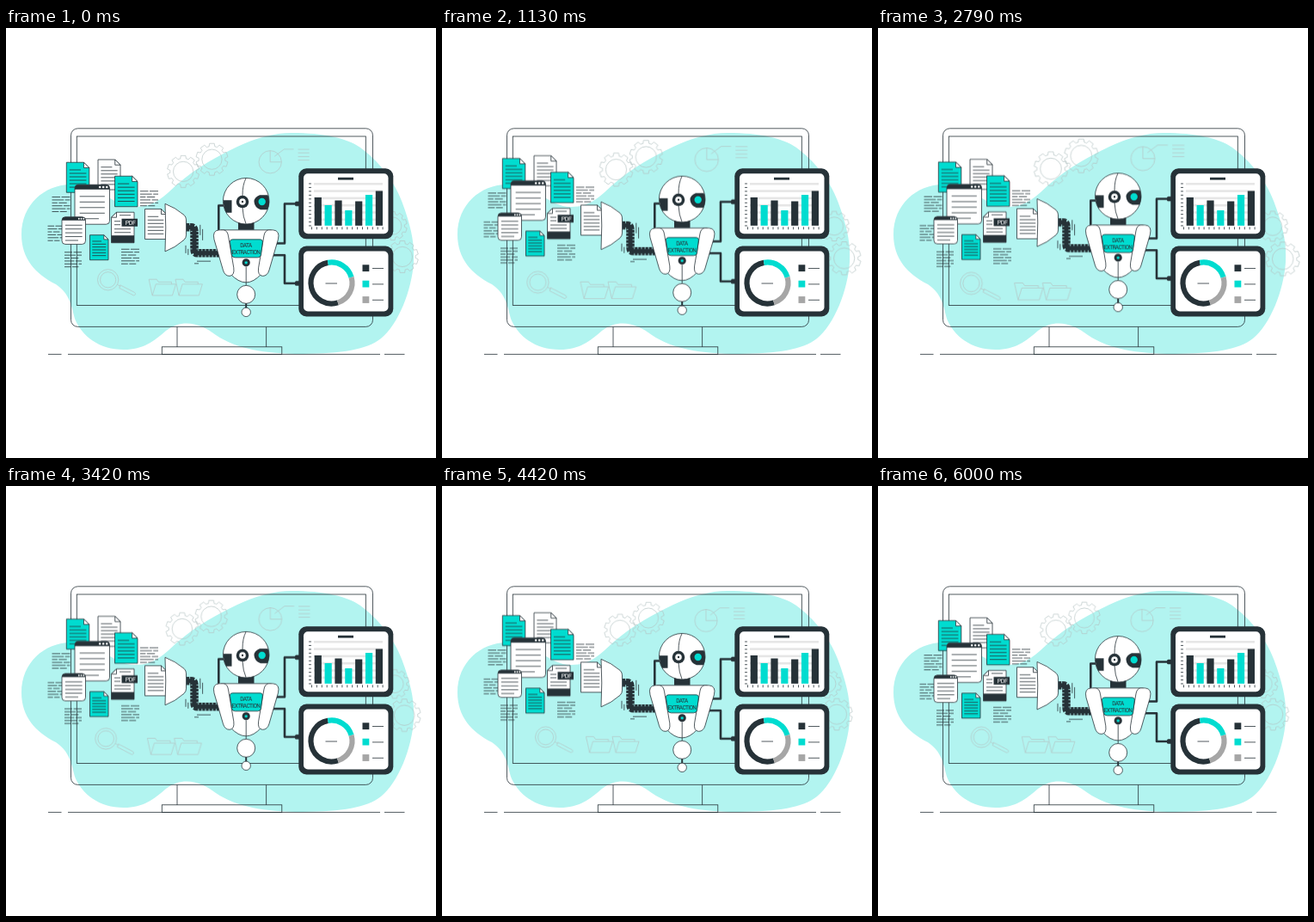
An HTML page that plays this animation: 500x500 px, repeating every 6.04 s.

```html
<!DOCTYPE html>
<html lang="en">
<head>
<meta charset="utf-8">
<title>Data extraction</title>
<style>
  html, body { margin: 0; width: 100%; height: 100%; overflow: hidden; background: #fff; }
  svg { display: block; width: 100%; height: 100%; }
  .line { fill: none; stroke: #263238; stroke-width: .8; }
  .paper { fill: #fff; stroke: #263238; stroke-width: .8; stroke-linejoin: round; }
  .teal { fill: #00dcd0; }
  .dark { fill: #263238; }
  .grey { fill: #a6a6a6; }
  .cable { fill: none; stroke: #263238; stroke-width: 2.6; stroke-linejoin: round; }
  #decor { fill: none; stroke: #b4c3c3; stroke-width: .65; transform-origin: 293px 222px; }
  text { text-anchor: middle; font-family: Roboto, "Liberation Sans", sans-serif; }
</style>
</head>
<body>
<svg viewBox="0 0 500 500">
  <path fill="#b2f4f0" d="M18 240C18 206 44 182 76 182C110 182 124 208 150 208C174 208 184 195 200 181
    C222 162 246 149 269 138C290 128 312 122 332 122C370 122 396 128 412 139C440 160 456 186 464 212
    C472 236 475 252 474 272C472 305 456 345 436 361C420 374 390 378.500 345 379C300 379 268 373 244 357
    C227 344 206 337 186 352C172 364 160 374 137 374C108 374 88 358 80 338C75 318 73 309 58 298
    C34 286 18 268 18 240Z"/>
  <g class="line">
    <rect x="75.5" y="116.8" width="351" height="230.6" rx="8"/>
    <rect x="82.3" y="126" width="336" height="196.5"/>
    <path d="M199 347.5V371M302.6 347.5V371M49 379.4H64.5M72 379.4H435M440 379.4H463.5"/>
    <rect x="181.3" y="370.8" width="139.5" height="8.6"/>
  </g>
  <g id="decor"></g>
  <g id="robotBack"></g>
  <g id="docs"></g>
  <g id="robot"></g>
  <g id="panels"></g>
</svg>
<script>
const byId = id => document.getElementById(id);
const path = (d, cls = 'line', extra = '') => `<path class="${cls}" d="${d}" ${extra}/>`;
const rect = (x, y, w, h, cls, rx = 0) =>
  `<rect x="${x}" y="${y}" width="${w}" height="${h}" rx="${rx}" class="${cls}"/>`;
const circle = (x, y, r, cls = '') => `<circle cx="${x}" cy="${y}" r="${r}" class="${cls}"/>`;
const range = (n, fn) => Array.from({ length: n }, (_, i) => fn(i)).join('');

// Background decorations
function gear(cx, cy, r, hole) {
  const teeth = 10, step = 2 * Math.PI / teeth, root = r * .82;
  const at = (rad, a) => `${(cx + rad * Math.cos(a)).toFixed(2)} ${(cy + rad * Math.sin(a)).toFixed(2)}`;
  const d = range(teeth, i => {
    const a = i * step - Math.PI / 2;
    return `${i ? 'L' : 'M'}${at(root, a - .22)}L${at(r, a - .15)}L${at(r, a + .15)}L${at(root, a + .22)}`
      + `A${root} ${root} 0 0 1 ${at(root, a + step - .22)}`;
  });
  return path(d + 'Z', '') + circle(cx, cy, hole);
}
const folder = x => path(`M${x + 4} 310L${x} 291.5H${x + 9}L${x + 11} 294.5H${x + 26}V297
  M${x + 4} 310L${x + 8} 297H${x + 31}L${x + 27} 310Z`, '');

byId('decor').innerHTML =
  gear(207, 167.5, 18.5, 11.5) + gear(240, 153.5, 18.5, 11.5) +
  gear(448, 230, 16.5, 10) + gear(459, 265.5, 18.5, 11.5) +
  circle(307, 156.5, 13) +
  path('M307 143.5V156.5H320M312 150L323 141.8H334M339 142H352M339 146H352M339 150.3H352M339 154.3H352', '') +
  folder(167.5) + folder(198) +
  circle(120.5, 292, 12) + circle(120.5, 292, 9) +
  path('M131 297.5L135 299.5M134.5 298L151 306.5Q153.5 309 150 310L133.5 301.5Z', '');

// Floating documents
function doc(x, y, w, h, cls = '') {
  const f = w * .24;
  return path(`M${x} ${y}H${x + w - f}L${x + w} ${y + f}V${y + h}H${x}Z`, 'paper ' + cls) +
    path(`M${x + w - f} ${y}V${y + f}H${x + w}Z`, 'paper') +
    range(6, i => path(`M${x + w * .13} ${y + h * (.25 + i * .115)}h${w * (i ? .74 : .5)}`));
}
function windowBox(x, y, w, h, bar, rows) {
  return rect(x, y, w, h, 'paper', 4) +
    path(`M${x} ${y + bar}V${y + 4}Q${x} ${y} ${x + 4} ${y}H${x + w - 4}Q${x + w} ${y} ${x + w} ${y + 4}V${y + bar}Z`, 'dark') +
    range(3, i => `<circle cx="${x + w * (.72 + i * .1)}" cy="${y + bar / 2}" r="${bar * .24}" fill="#fff"/>`) +
    range(rows, i => path(`M${x + w * .14} ${y + bar + (h - bar) * (.2 + i * .64 / (rows - 1))}h${w * (i == rows - 1 ? .55 : .72)}`));
}
const note = (x, y, w) => range(6, i => {
  const cut = w * [.5, .7, .35, .62, .8, .42][i];
  const end = w * (i % 3 == 2 ? .82 : 1);
  return path(`M${x} ${y + i * 3.4}h${cut - 1}m1.5 0H${x + end}`);
});

byId('docs').innerHTML =
  note(53.5, 196.8, 21) + note(48.5, 230.5, 17) + note(68, 261, 20) +
  note(156, 190, 21) + note(134, 257.5, 21) +
  doc(107, 153.3, 26, 35) + doc(70.3, 156.5, 26.5, 35, 'teal') +
  windowBox(80, 182.5, 40.5, 46, 5.5, 5) + doc(126.5, 172.5, 26.5, 35.5, 'teal') +
  windowBox(65, 220, 27.5, 31.7, 4, 5) + doc(97.5, 241, 21.5, 29, 'teal') +
  path('M128.5 214.5H149V250H122.5V220.5Z', 'paper') + path('M128.5 214.5V220.5H122.5Z', 'paper') +
  path('M132 218H145M126 225H133M126 229H133M126 234H145M126 238H145') +
  rect(122.5, 241.5, 26.5, 8.5, 'dark') + rect(134.5, 222, 18.5, 9, 'dark') +
  '<text x="144.6" y="229.2" font-size="7" letter-spacing="-.4" fill="#fff">PDF</text>' +
  doc(161.5, 210.8, 25, 35);

// Robot, funnel and cables
byId('robotBack').innerHTML =
  path('M314 250.5H324V204.5H341M309 264.3H324V297H341', 'cable') +
  rect(336, 201.7, 7, 5.6, 'dark', 1.5) + rect(336, 294.2, 7, 5.6, 'dark', 1.5) +
  path('M247.3 246V206.5H256', 'cable');

const tube = 'M210 231.8H215Q219 231.8 219 236V258Q219 262 223 262H248';
const arm = 'M248 235H253Q257.5 235.5 258.5 242L264.8 279Q266 288 260 288.5Q254.5 288.5 252.5 282L242 246Q239.5 235.5 248 235Z';

byId('robot').innerHTML =
  path('M209 253V262M211.8 257V264M225.8 229V241M228.6 234V247M222 271.3H238M219 274H224') +
  path(tube, 'line', 'style="stroke-width:5"') +
  path(tube, 'line', 'style="stroke-width:9.5;stroke-dasharray:3.3 .8"') +
  path('M185 204.5Q197 209 207 217.5Q209.5 220 209.5 223V241Q209.5 244 207 246.5Q197 255.5 185 260Q186.5 232 185 204.5Z', 'paper') +
  rect(270, 226, 18.5, 9, 'dark') +
  circle(279.2, 201.4, 26.8, 'paper') +
  path('M279.2 174.6Q275 182 275 195M275 209Q275.5 220 279.2 228.2') +
  path('M252.7 200.5H262.5V215H256Q252.7 209 252.7 200.5Z', 'dark') +
  circle(275, 202.2, 7.3, 'dark') + '<circle cx="275" cy="202.2" r="3.8" fill="#fff"/>' +
  circle(275, 202.2, 1.2, 'dark') +
  path('M304.5 194.5H295Q288.5 197 288.5 202.2Q289 209 296 211.3H304Q308 203 304.5 194.5Z', 'dark') +
  circle(297.7, 202.2, 4.2, 'teal') +
  path('M279.2 295V302') +
  path('M250 235H308.4L297 286Q288 296 279.2 296Q270 296 261 286Z', 'paper') +
  path(arm, 'paper') + path(arm, 'paper', 'transform="matrix(-1 0 0 1 558.4 0)"') +
  path('M279.2 278V296') +
  path('M264 246H295Q298.8 246 298.3 249.5L296.5 264Q296 267 292.5 267H266.5Q263 267 262.5 264L260.5 249.5Q260 246 264 246Z', 'paper teal') +
  '<g class="dark" font-size="6.5" letter-spacing="-.6"><text x="279" y="255.2">DATA</text><text x="279" y="263.2">EXTRACTION</text></g>' +
  circle(279.2, 273, 4.6, 'dark') + circle(279.2, 273, 1.7, 'teal') +
  path('M279.2 319V327', 'cable', 'style="stroke-width:2"') +
  circle(279.2, 310, 10.5, 'paper') + circle(279.2, 330.5, 5.2, 'paper');

// Chart panels
const frame = y => rect(340.3, y, 110, 82, 'dark', 9) +
  `<rect x="346" y="${y + 6}" width="98.5" height="70" rx="5" fill="#fff"/>`;
const arc = (from, to, color) => {
  const at = deg => {
    const a = deg * Math.PI / 180;
    return `${378.5 + 24 * Math.cos(a)} ${296.5 + 24 * Math.sin(a)}`;
  };
  return `<path d="M${at(from)}A24 24 0 ${to - from > 180 ? 1 : 0} 1 ${at(to)}" fill="none" stroke="${color}" stroke-width="6.2"/>`;
};
const barTops = [197, 206, 200.5, 212, 201.5, 194, 189.5];

byId('panels').innerHTML =
  frame(163.3) + rect(386, 173.8, 18, 2.8, 'dark') +
  range(6, i => `<rect x="358" y="${180 + i * 8.3}" width="80" height="2.6" fill="#e6e6e6"/>`) +
  range(12, i => path(`M352 ${181 + i * 4.45}H355`)) +
  range(15, i => path(`M${355.5 + i * 5.9} 231.3V234.3`)) +
  barTops.map((y, i) => rect(358.7 + i * 11.85, y, 8.2, 229.8 - y, i % 2 ? 'teal' : 'dark')).join('') +
  frame(253.5) +
  arc(72, 260, '#263238') + arc(-100, -16, '#00dcd0') + arc(-16, 72, '#a6a6a6') +
  path('M371.5 297H385') +
  ['dark', 'teal', 'grey'].map((c, i) =>
    rect(414.5, 275.3 + i * 18.4, 7.8, 7.8, c) + path(`M426 ${279.5 + i * 18.4}H439`)).join('');

// Motion
const LOOP = 6040;
const play = (id, frames, duration) =>
  byId(id).animate(frames, { duration, delay: -50, iterations: Infinity, easing: 'linear' });
const bob = ['translateY(0px)', 'translateY(-6.2px)', 'translateY(0px)'].map(transform => ({ transform }));
const pulse = [[0, 1], [.1, 1.1], [.3, 1], [.4, 1], [.5, 1.1], [.6, 1], [1, 1]]
  .map(([offset, s]) => ({ offset, transform: `scale(${s})` }));

play('decor', pulse, LOOP);
play('docs', bob, LOOP / 2);
play('robot', bob, LOOP);
play('robotBack', bob, LOOP);
</script>
</body>
</html>
```
